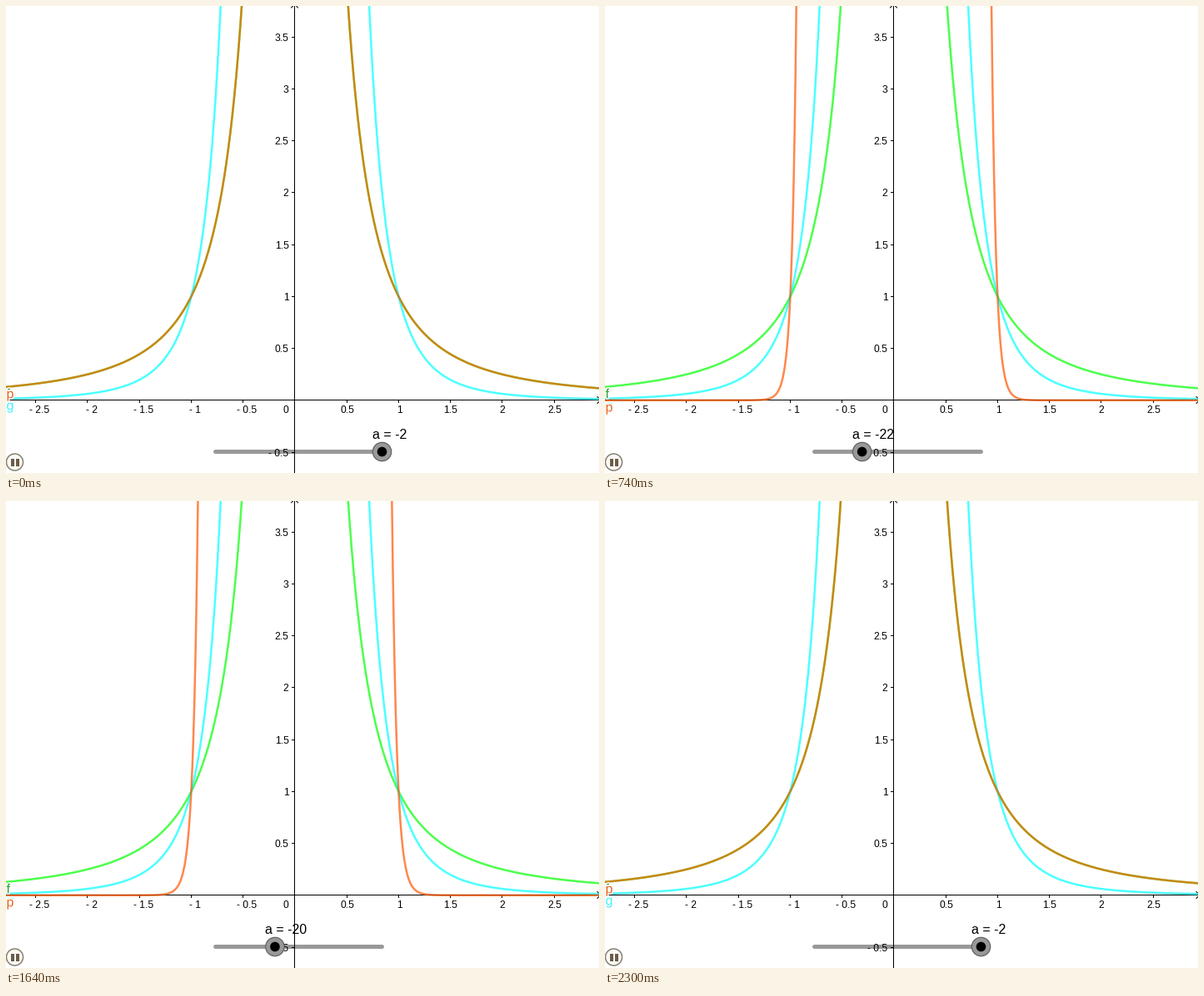
Recreate the animation shown at these times as a matplotlib script. Size 712 px wide and 560 px high, loop 2380 ms.

```python
import numpy as np
import matplotlib.pyplot as plt
from matplotlib.animation import FuncAnimation
from matplotlib.patches import Circle, Rectangle
from matplotlib.patheffects import withStroke

W, H, DPI = 712, 560, 100
LOOP, TICK = 2380, 10
PX = 72 / DPI                # points per pixel
OX, OY, UNIT = 346.9, 472.85, 124.5
LEFT = -OX / UNIT
TRACK_L, TRACK_R, TRACK_Y = 251.5, 451.5, 534.5

plt.rcParams["font.family"] = "Liberation Sans"
fig = plt.figure(figsize=(W / DPI, H / DPI), dpi=DPI, facecolor="white")
ax = fig.add_axes([0, 0, 1, 1])
ax.set_xlim(0, W)
ax.set_ylim(H, 0)
ax.axis("off")


def line(xs, ys, color="black", width=1, **kw):
    return ax.plot(xs, ys, color=color, lw=width * PX, snap=False, **kw)[0]


def text(x, y, s, size=12, color="black", ha="left", halo=False, **kw):
    effects = [withStroke(linewidth=3 * PX, foreground="white")] if halo else None
    return ax.text(x, y, s, fontsize=size * PX, color=color, ha=ha,
                   va="baseline", path_effects=effects, **kw)


def pixel(v):
    """Centre of the pixel that holds v."""
    return np.floor(v) + 0.5


def power_curve(a):
    """Screen points of y = |x|^a, both branches."""
    start = 4.2 ** (1 / a)
    x = start + (2.96 - start) * np.linspace(0, 1, 300) ** 2
    y = OY - UNIT * x ** a
    gap = [np.nan]
    return (np.concatenate([OX - UNIT * x, gap, OX + UNIT * x]),
            np.concatenate([y, gap, y]))


def label_y(a):
    return OY - UNIT * abs(LEFT) ** a + 13.5


def number(v):
    return ("- " if v < 0 else "") + f"{abs(v):g}"


def draw_axes():
    x0, y0 = pixel(OX), pixel(OY)
    line([0, W], [y0, y0], zorder=1)
    line([x0, x0], [0, H], zorder=1)
    line([x0 - 4, x0, x0 + 4], [2, -2, 2], zorder=1)
    line([W - 2, W + 2, W - 2], [y0 - 4, y0, y0 + 4], zorder=1)
    for v in np.arange(-2.5, 3, 0.5):
        if v == 0:
            continue
        x = pixel(OX + UNIT * v)
        line([x, x], [y0, y0 + 3], zorder=1)
        text(x + (5 if v < 0 else 0.5), 488, number(v), ha="center", zorder=1)
    for v in np.arange(-0.5, 4, 0.5):
        if v == 0:
            continue
        y = pixel(OY - UNIT * v)
        line([x0 - 3, x0], [y, y], zorder=1)
        text(339.5, y + 4.5, number(v), ha="right", zorder=1)
    text(339.5, 488, "0", ha="right", zorder=1)


def draw_pause():
    brown = "#6b5d48"
    ax.add_patch(Circle((10.5, 547), 10, fc="#fbfaf6", ec="#85806f",
                        lw=1.5 * PX, zorder=6))
    for x in (6.3, 11.8):
        ax.add_patch(Rectangle((x, 542.5), 3.8, 9.5, fc=brown, lw=0, zorder=7))


draw_axes()
draw_pause()
line(*power_curve(-2), color="#00ff00", width=2.5, alpha=0.7, zorder=2)
line(*power_curve(-4), color="#00ffff", width=2.5, alpha=0.7, zorder=2)
p_curve = line([], [], color="#ff5500", width=2.5, alpha=0.7, zorder=3)

text(0.5, label_y(-2), "f", 16, "#2aa02a", halo=True, zorder=4)
text(0.5, label_y(-4), "g", 16, "#40f4ff", halo=True, zorder=4)
p_label = text(0.5, 0, "p", 16, "#e8641e", halo=True, zorder=5)

line([TRACK_L, TRACK_R], [TRACK_Y] * 2, width=5, alpha=0.4,
     solid_capstyle="round", zorder=6)
knob = ax.add_patch(Circle((0, TRACK_Y), 11.2, fc="#999999", ec="#60605c",
                           lw=1.2 * PX, zorder=7))
dot = ax.add_patch(Circle((0, TRACK_Y), 5.8, fc="black", lw=0, zorder=8))
a_label = text(0, 519, "", 16, zorder=8)

# The slider steps about every 75 ms: 14 down, a rest, 14 up.
STEP_AT = np.interp(np.arange(32), [0, 1, 6, 8, 10, 22, 26, 31],
                    [0, 80, 460, 600, 740, 1640, 1920, 2300])
STEP_AT = np.round(STEP_AT / TICK) * TICK


def slider_value(ms):
    step = np.searchsorted(STEP_AT, ms, side="right") - 1
    return -2 - 2 * int(min(step, 14, 31 - step))


def update(i):
    a = slider_value(i * TICK)
    x = TRACK_R + (a + 2) / 28 * (TRACK_R - TRACK_L)
    p_curve.set_data(*power_curve(a))
    p_label.set_y(label_y(a))
    knob.center = dot.center = (x, TRACK_Y)
    a_label.set_x(x - 11.5)
    a_label.set_text(f"a = {a}")
    return p_curve, p_label, knob, dot, a_label


anim = FuncAnimation(fig, update, frames=LOOP // TICK, interval=TICK,
                     repeat=True, repeat_delay=0, blit=False)
plt.show()
```
